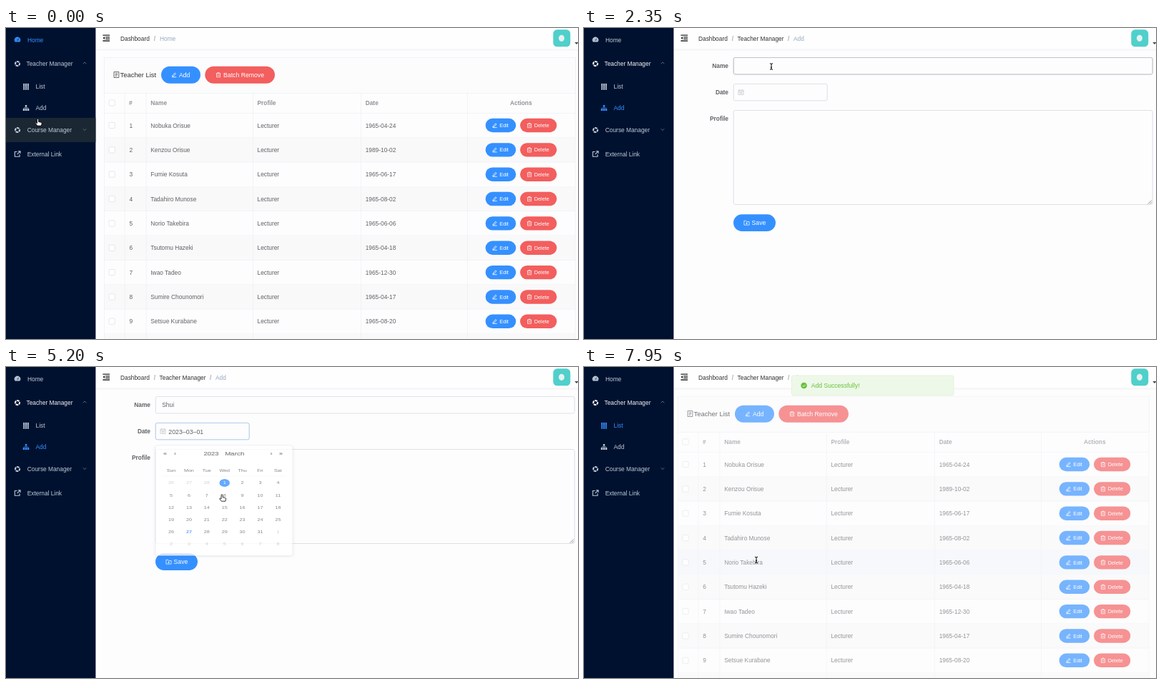
Animation of 800 by 436 pixels, one loop 8000 ms. Source, as an HTML page:

```html
<!DOCTYPE html>
<html lang="en">
<head>
<meta charset="utf-8">
<title>Teacher admin</title>
<style>
html, body { margin: 0; width: 100%; height: 100%; overflow: hidden; background: #fdfdfe; }
svg { display: block; width: 800px; height: 436px; }
text { font-family: "Liberation Sans", Arial, sans-serif; white-space: pre; }
</style>
</head>
<body>
<svg id="stage" viewBox="0 0 800 436"></svg>
<script>
const LOOP = 8000, BLUE = '#3590ff', RED = '#f35e5e', GREY = '#606266', MENU = '#bfcbd9', LINE = '#ebeef3';
const TO_FORM = 785, TO_LIST = 7253, PICK_OPEN = 3740, PICK_CLOSE = 5184;
const TYPED = 'Shui', DATE = '2023–03–01';

// Drawing helpers; text is centred vertically on y.
const text = (x, y, s, fill = GREY, size = 8.36, more = '') =>
  `<text x="${x}" y="${(y + size * .36).toFixed(2)}" font-size="${size}" fill="${fill}" ${more}>${s}</text>`;
const rect = (x, y, w, h, fill = 'none', more = '') =>
  `<rect x="${x}" y="${y}" width="${w}" height="${h}" fill="${fill}" ${more}/>`;
const path = (d, more = '') => `<path d="${d}" fill="none" stroke="currentColor" stroke-width=".8" ${more}/>`;
const group = (id, body, more = '') => `<g id="${id}" ${more}>${body}</g>`;
const at = (x, y, body, color = 'currentColor') => `<g transform="translate(${x} ${y})" color="${color}">${body}</g>`;
const range = n => [...Array(n).keys()];
const BOLD = 'font-weight="700"', MID = 'text-anchor="middle"';

const icon = {
  gauge: path('M-3.3 3A4.2 4.2 0 1 1 3.3 3Z', 'style="fill:currentColor;stroke:none"') +
    path('M0 1.6L1.4 -1.8M-2.5 .6h.8M1.9 .6h.8M-1.6 -1.7l.5 .5', 'style="stroke:#00112f"'),
  ring: path('M3 0A3 3 0 1 1 -3 0A3 3 0 1 1 3 0', 'style="stroke-width:2.1" stroke-dasharray="3.8 .91" stroke-dashoffset="1.4"'),
  grid: path('M-4 -3.2H4M-4 -.8H4M-4 1.4H4M-4 3.6H4', 'style="stroke-width:1.8" stroke-dasharray="2.3 .55"'),
  tree: path('M-1.2 -4h2.4v2.6h-2.4zM-4.3 1.3h2.5v2.6h-2.5zM-1.2 1.3h2.4v2.6h-2.4zM1.8 1.3h2.5v2.6h-2.5z', 'style="fill:currentColor;stroke:none"') +
    path('M0 -2V1.5M-3 1.5V0H3V1.5', 'style="stroke-width:.7"'),
  link: path('M-.5 -3H-3.7V3.8H3V.8M.8 -3.8H4V-.6M4 -3.8L-.4 .6', 'style="stroke-width:1.1"'),
  pen: path('M-2.8 3.1H3.2M-2.4 1.4L1.2 -2.7L2.5 -1.5L-.9 2.1L-2.7 2.3Z'),
  bin: path('M-3.2 -2H3.2M-1.1 -2V-3.1H1.1V-2M-2.5 -2V3.2H2.5V-2M-.8 -.3V1.7M.8 -.3V1.7', 'style="stroke-width:.7"'),
  save: path('M-3.6 -2.8H-.8L.2 -1.7H3.6V3H-3.6ZM-1.4 .7H1.4M0 -.7V2.1', 'style="stroke-width:.7"'),
  calendar: path('M-3.6 -2.9H3.6V3.4H-3.6ZM-3.6 -1H3.6M-1.8 -3.7V-2M1.8 -3.7V-2M-2 .4H2M-2 1.9H2', 'style="stroke-width:.7"'),
  sheet: path('M-3.4 -4H3.4V4H-3.4ZM-1.7 -1.8H1.7M-1.7 0H1.7M-1.7 1.8H.5', 'style="stroke-width:.7"')
};

const button = (x, cy, w, h, fill, glyph, gx, tx, label, size) =>
  rect(x, cy - h / 2, w, h, fill, `rx="${h / 2}"`) + at(gx, cy, icon[glyph], '#fff') + text(tx, cy, label, '#fff', size);

const menuItem = (id, x, y, glyph, tx, label) =>
  group(id, at(x, y, icon[glyph]) + text(tx, y + .4, label, 'currentColor'), `color="${MENU}"`);

function sidebar() {
  return rect(0, 0, 125.4, 436, '#00112f') +
    rect(0, 126, 125.4, 34, '#1b2733', 'id="hoverCourse"') + rect(0, 97, 125.4, 29, '#1b2733', 'id="hoverAdd"') +
    menuItem('mHome', 16, 16.5, 'gauge', 30, 'Home') +
    menuItem('mTeacher', 16, 50, 'ring', 28.5, 'Teacher Manager') +
    menuItem('mList', 28, 82, 'grid', 41.5, 'List') +
    menuItem('mAdd', 28, 112, 'tree', 41.5, 'Add') +
    menuItem('mCourse', 16, 143, 'ring', 29.8, 'Course Manager') +
    menuItem('mLink', 16, 176.5, 'link', 29.8, 'External Link') +
    at(110, 49, path('M-2.3 1.2L0 -1L2.3 1.2'), '#6f7a8a') + at(110, 142.5, path('M-2.3 -1.2L0 1L2.3 -1.2'), '#6f7a8a');
}

const crumb = (id, x, label, fill) => group(id, text(x, 14.5, label, fill));
const slash = (x, more = '') => text(x, 14.5, '/', '#a9adb6', 8.36, BOLD + more);

function navbar() {
  return rect(125.4, 0, 675, 29.6, '#fefefe') + rect(125.4, 29.6, 675, 1, '#f0f1f3') + rect(125.4, 30.6, 675, 1.4, '#f8f8fa') +
    at(140, 14, path('M-4.6 -3.8H5M-.8 -1.2H5M-.8 1.4H5M-4.6 4H5', 'style="stroke-width:1.3"') +
      path('M-4.6 .1L-1.9 -1.9V2.1Z', 'style="fill:currentColor;stroke:none"'), '#222') +
    text(160, 14.5, 'Dashboard', '#303133') + slash(206.8) +
    crumb('cHome', 215, 'Home', '#97a8be') +
    group('cTeacher', text(214.6, 14.5, 'Teacher Manager', '#303133') + slash(285)) +
    group('cAdd', text(293, 14.5, 'Add', '#97a8be') + slash(314.5, ' id="cTail"')) +
    crumb('cList', 293, 'List', '#97a8be') +
    rect(765.3, 2.3, 24, 24, '#4fd0cb', 'rx="5.5"') + '<ellipse cx="777" cy="14.3" rx="4" ry="4.6" fill="#e6f2f0"/>' +
    '<path d="M795.3 20h5.4l-2.7 3z" fill="#444"/>';
}

const ROWS = [
  ['Nobuka Orisue', '1965-04-24'], ['Kenzou Orisue', '1989-10-02'], ['Fumie Kosuta', '1965-06-17'],
  ['Tadahiro Munose', '1965-08-02'], ['Norio Takebira', '1965-06-06'], ['Tsutomu Hazeki', '1965-04-18'],
  ['Iwao Tadeo', '1965-12-30'], ['Sumire Chounomori', '1965-04-17'], ['Setsue Kurabane', '1965-08-20'], ['', '']
];
const STEP = 34.35;

function table() {
  const check = cy => rect(144, cy - 4.1, 8.2, 8.2, '#fff', 'rx="1.2" stroke="#dcdfe6" stroke-width=".7"');
  const head = (x, s, more = '') => text(x, 105, s, '#909399', 8.36, BOLD + ' ' + more);
  const rows = ROWS.map(([name, date], i) => {
    const cy = 136.5 + STEP * i, top = 119.3 + STEP * i;
    return (i % 2 ? rect(137.5, top, 659, STEP, '#f9f9fa') : '') +
      (i == 4 ? rect(137.5, top, 659, STEP, '#f5f7fa', 'id="rowHover"') : '') +
      rect(137.5, top + STEP - .35, 659, .7, LINE) + check(cy) + text(172.4, cy, i + 1) + text(202.3, cy, name) +
      text(351.5, cy, 'Lecturer') + text(502.7, cy, date) +
      button(670.6, cy, 42.6, 19.4, BLUE, 'pen', 683.5, 690.3, 'Edit', 7.3) +
      button(719, cy, 51.3, 19.4, RED, 'bin', 732, 738.8, 'Delete', 7.3);
  }).join('');
  return rect(137.5, 41.3, 659, 50, '#fcfcfd', `stroke="${LINE}" stroke-width=".8"`) +
    at(154.4, 65.5, icon.sheet, '#303133') + text(159.6, 65.7, 'Teacher List', '#303133', 9.4) +
    button(217, 65.7, 55, 24, BLUE, 'pen', 235, 242, 'Add', 8.6) +
    button(278.3, 65.7, 97.7, 24, RED, 'bin', 297, 304, 'Batch Remove', 8.7) +
    check(105) + head(172, '#') + head(202.3, 'Name') + head(351.5, 'Profile') + head(502.7, 'Date') + head(720.3, 'Actions', MID) +
    rect(137.5, 119, 659, .7, LINE) + rows +
    [137.5, 166, 196, 345.3, 496.3, 645.5, 796].map(x => rect(x - .35, 91, .7, 345, LINE)).join('');
}

function field(id, y, w, h) {
  const box = (fill, stroke, more) => rect(209.2, y, w, h, fill, `rx="2.4" stroke="${stroke}" stroke-width=".8" ${more}`);
  return box('#fdfdfe', '#d6d9df', '') + box('none', '#aeb2ba', `id="${id}Hover"`) + box('none', BLUE, `id="${id}Focus"`);
}

function form() {
  const label = (y, s) => text(202, y, s, GREY, 8.36, BOLD + ' text-anchor="end"');
  return label(53.3, 'Name') + label(90.3, 'Date') + label(127.3, 'Profile') +
    field('name', 41.4, 586, 23.6) + field('date', 78.4, 131, 23.4) + field('profile', 115.5, 586, 132) +
    text(218.3, 53.3, '', GREY, 8.36, 'id="nameText"') + text(218.3, 125.5, '', GREY, 8.36, 'id="profileText"') +
    text(227.3, 90.4, '', GREY, 8.8, 'id="dateText"') + at(219.5, 90, icon.calendar, '#c0c4cc') +
    rect(0, 0, .7, 10, '#222', 'id="caret"') +
    path('M788.8 246.6L794 241.4M791.6 246.6L794 244.2', 'style="stroke:#777"') +
    '<circle id="helper" cx="787.8" cy="240" r="4.8" fill="#10243a"/>' +
    rect(209, 261.2, 59, 23.8, BLUE, 'id="saveBack" rx="11.9"') + at(227.5, 273.2, icon.save, '#fff') + text(234.5, 273.2, 'Save', '#fff', 8.7);
}

function picker() {
  const colX = i => 231 + 24.9 * i, rowY = i => 178.7 + 22.4 * i;
  const days = range(42).map(i => {
    const d = i - 2, x = colX(i % 7), y = rowY(Math.floor(i / 7));
    const shown = d < 1 ? d + 28 : d > 31 ? d - 31 : d;
    const fill = d < 1 || d > 31 ? '#c0c4cc' : d == 27 ? BLUE : GREY;
    return (d == 1 ? `<circle id="dayDot" cx="${x}" cy="${y}" r="7.2" fill="${BLUE}"/>` : '') +
      text(x, y, shown, fill, 7.16, MID + (d == 27 ? ' ' + BOLD : '') + (d == 1 ? ' id="dayOne"' : ''));
  }).join('');
  const arrows = [[222.6, '«'], [236.6, '‹'], [371, '›'], [384.5, '»']];
  return rect(209.2, 110, 191.6, 202, '#fff', 'rx="2.4" stroke="#e0e3e9" stroke-width=".7" filter="url(#soft)"') +
    arrows.map(([x, s]) => text(x, 124.8, s, '#303133', 9, MID)).join('') +
    text(276.5, 125.4, '2023', GREY, 9.4, 'stroke="#606266" stroke-width=".25"') +
    text(306.2, 125.4, 'March', GREY, 9.8, 'stroke="#606266" stroke-width=".25"') +
    ['Sun', 'Mon', 'Tue', 'Wed', 'Thu', 'Fri', 'Sat'].map((s, i) => text(colX(i), 155.5, s, GREY, 7.16, MID)).join('') +
    rect(218, 166, 174, .6, LINE) + days;
}

const cursors = group('hand', '<path d="M-1 .9Q0 -.9 1 .9V4L4.6 4.8Q5.9 5.2 5.6 6.6L4.8 9.6H-.6L-3.4 6Q-3 4.6 -1 6.2Z" fill="#fff" stroke="#000" stroke-width=".8"/>') +
  group('beam', '<path d="M-2 -4.3Q0 -4.3 0 -3Q0 -4.3 2 -4.3M0 -3V3M-2 4.3Q0 4.3 0 3Q0 4.3 2 4.3M-1 1.2H1" fill="none" stroke="#000" stroke-width="1"/>') +
  group('arrow', '<path d="M0 0V9.4L2.2 7.4L3.7 10.8L5.2 10.1L3.7 6.8H6.7Z" fill="#000" stroke="#fff" stroke-width=".7"/>');

document.getElementById('stage').innerHTML =
  '<defs><clipPath id="main"><rect x="125.4" y="30" width="674.6" height="406"/></clipPath>' +
  '<filter id="soft" x="-10%" y="-10%" width="120%" height="120%"><feDropShadow dx="0" dy="1.2" stdDeviation="2.4" flood-opacity=".12"/></filter></defs>' +
  rect(0, 0, 800, 436, '#fdfdfe') + navbar() +
  `<g clip-path="url(#main)">${group('table', table())}${group('form', form())}</g>` +
  sidebar() + group('picker', picker()) + rect(0, 0, 0, 1.3, '#2a8df5', 'id="bar"') +
  group('status', '<path d="M-1 425.3H118.4Q121.3 425.3 121.3 428V437H-1Z" fill="#e4e4e6" stroke="#b9babd" stroke-width=".6"/>' +
    text(2.8, 431.1, 'localhost:9528/#/vod/teacher/add', '#333', 7.7)) +
  group('message', rect(290.5, 12, 226.5, 27.8, '#eef8e8', 'rx="2.4" stroke="#dff0d6" stroke-width=".8"') +
    '<circle cx="307.6" cy="26" r="4.3" fill="#67c23a"/>' + at(307.6, 26, path('M-1.9 .1L-.5 1.5L2 -1.2', 'style="stroke-width:.9"'), '#fff') +
    text(317.8, 26, 'Add Successfully!', '#67c23a', 8.6)) +
  group('cursor', cursors);

const el = {};
document.querySelectorAll('[id]').forEach(e => el[e.id] = e);

// Motion helpers.
const clamp = v => Math.min(1, Math.max(0, v));
const bezier = (x1, y1, x2, y2) => v => {
  const curve = (s, a, b) => 3 * (1 - s) ** 2 * s * a + 3 * (1 - s) * s * s * b + s ** 3;
  let lo = 0, hi = 1, x = clamp(v);
  for (let i = 0; i < 18; i++) {
    const mid = (lo + hi) / 2;
    if (curve(mid, x1, x2) < x) lo = mid; else hi = mid;
  }
  return curve((lo + hi) / 2, y1, y2);
};
const ease = bezier(.25, .1, .25, 1), zoom = bezier(.23, 1, .32, 1);
const ramp = (t, start, length, curve = ease) => curve(clamp((t - start) / length));
const shown = (t, from, to, length = 200, curve = ease) => ramp(t, from, length, curve) * (1 - ramp(t, to, length, curve));
const put = (id, opacity, x = 0, y = 0) => {
  el[id].style.opacity = opacity;
  el[id].setAttribute('transform', `translate(${x} ${y})`);
};
const fade = (id, opacity) => el[id].style.opacity = opacity;
const paint = (id, color) => el[id].setAttribute('color', color);

const TRACK = [[0, 44.5, 127.5], [300, 44.5, 118], [1800, 44.5, 118], [2350, 262, 54], [3250, 262, 54], [3600, 241.5, 86],
  [4050, 241.5, 86], [4700, 302, 178.6], [5400, 302, 178.6], [5800, 255, 179], [6550, 255, 179], [6880, 241, 270.5], [8000, 241, 270.5]];
const POINTERS = [[0, 'hand'], [1960, 'arrow'], [2230, 'beam'], [4180, 'hand'], [5330, 'beam'], [6770, 'hand'], [7700, 'beam']];
const KEYS = [0, 150, 260, 400];

function cursorAt(t) {
  const i = Math.max(1, TRACK.findIndex(k => k[0] > t));
  const [t0, x0, y0] = TRACK[i - 1], [t1, x1, y1] = TRACK[i];
  const p = (1 - Math.cos(Math.PI * (t - t0) / (t1 - t0))) / 2;
  return [x0 + (x1 - x0) * p, y0 + (y1 - y0) * p];
}
const typed = (t, start) => TYPED.slice(0, KEYS.filter(k => t >= start + k).length);

function render(t) {
  const toForm = ramp(t, TO_FORM, 500), toList = ramp(t, TO_LIST, 500);
  const formIn = ramp(t, TO_FORM + 520, 500), listIn = ramp(t, TO_LIST + 504, 500);
  if (t < TO_FORM + 510) put('table', 1 - toForm, 18 * toForm);
  else put('table', listIn, -18 * (1 - listIn));
  put('form', formIn * (1 - toList), -18 * (1 - formIn) + 18 * toList);
  fade('rowHover', t > 7750 ? 1 : 0);

  put('cHome', 1 - toForm, t < TO_FORM ? 0 : 45 + 12 * toForm);
  put('cTeacher', toForm, 12 * (1 - toForm));
  put('cAdd', toForm * (1 - toList), 12 * (1 - toForm) + (t < TO_LIST ? 0 : 16 + 12 * toList));
  put('cList', toList, 12 * (1 - toList));
  fade('cTail', t < TO_FORM + 500 ? 1 : 0);

  paint('mHome', t < TO_FORM ? BLUE : MENU);
  paint('mTeacher', t < TO_FORM ? MENU : '#f4f4f5');
  paint('mAdd', t >= TO_FORM && t < TO_LIST ? BLUE : MENU);
  paint('mList', t >= TO_LIST ? BLUE : MENU);
  fade('hoverCourse', 1 - ramp(t, 80, 300));
  fade('hoverAdd', shown(t, 80, 1930, 300));
  fade('status', shown(t, 180, 2000, 150));

  const start = t < TO_LIST ? TO_FORM : TO_LIST;
  el.bar.setAttribute('width', 800 * ramp(t, start - 8, 200));
  fade('bar', 1 - ramp(t, start + 220, 200));

  fade('nameHover', shown(t, 2220, 3400));
  fade('dateHover', shown(t, 3480, 4120));
  fade('profileHover', shown(t, 5350, 6720));
  fade('nameFocus', shown(t, 2400, 3720));
  fade('dateFocus', shown(t, 3720, PICK_CLOSE - 60));
  fade('profileFocus', shown(t, 5880, 7130));
  fade('helper', shown(t, 5900, 7130, 100));
  el.saveBack.setAttribute('fill', t > 6790 ? '#62aeff' : BLUE);
  el.nameText.textContent = typed(t, 2800);
  el.profileText.textContent = typed(t, 6050);
  el.dateText.textContent = t >= PICK_CLOSE - 15 ? DATE : '';

  const inName = t > 2400 && t < 3720, inProfile = t > 5880 && t < 7130;
  const since = t - (inName ? t < 3200 ? 2400 : 2700 : t < 6450 ? 5880 : 6450);
  const typing = (t > 2800 && t < 3200) || (t > 6050 && t < 6450);
  fade('caret', (inName || inProfile) && (typing || since % 1000 < 500) ? 1 : 0);
  const box = inName ? el.nameText : el.profileText;
  el.caret.setAttribute('x', 218.6 + (box.textContent ? box.getComputedTextLength() : 0));
  el.caret.setAttribute('y', inName ? 48.3 : 120.4);

  const open = shown(t, PICK_OPEN, PICK_CLOSE, 300, zoom);
  fade('picker', open);
  el.picker.setAttribute('transform', `translate(0 ${110 * (1 - open)}) scale(1 ${Math.max(open, .001)})`);
  const chosen = t >= PICK_CLOSE - 15;
  fade('dayDot', chosen ? 1 : 0);
  el.dayOne.setAttribute('fill', chosen ? '#fff' : t > 4600 ? BLUE : GREY);

  const pop = ramp(t, TO_LIST + 20, 400);
  put('message', ramp(t, TO_LIST + 20, 300), 0, -28 * (1 - pop));

  const [x, y] = cursorAt(t), pointer = POINTERS.filter(k => k[0] <= t).pop()[1];
  put('cursor', 1, x, y);
  for (const id of ['hand', 'beam', 'arrow']) fade(id, id == pointer ? 1 : 0);
}

const tick = () => {
  render(performance.now() % LOOP);
  requestAnimationFrame(tick);
};
tick();
</script>
</body>
</html>
```
